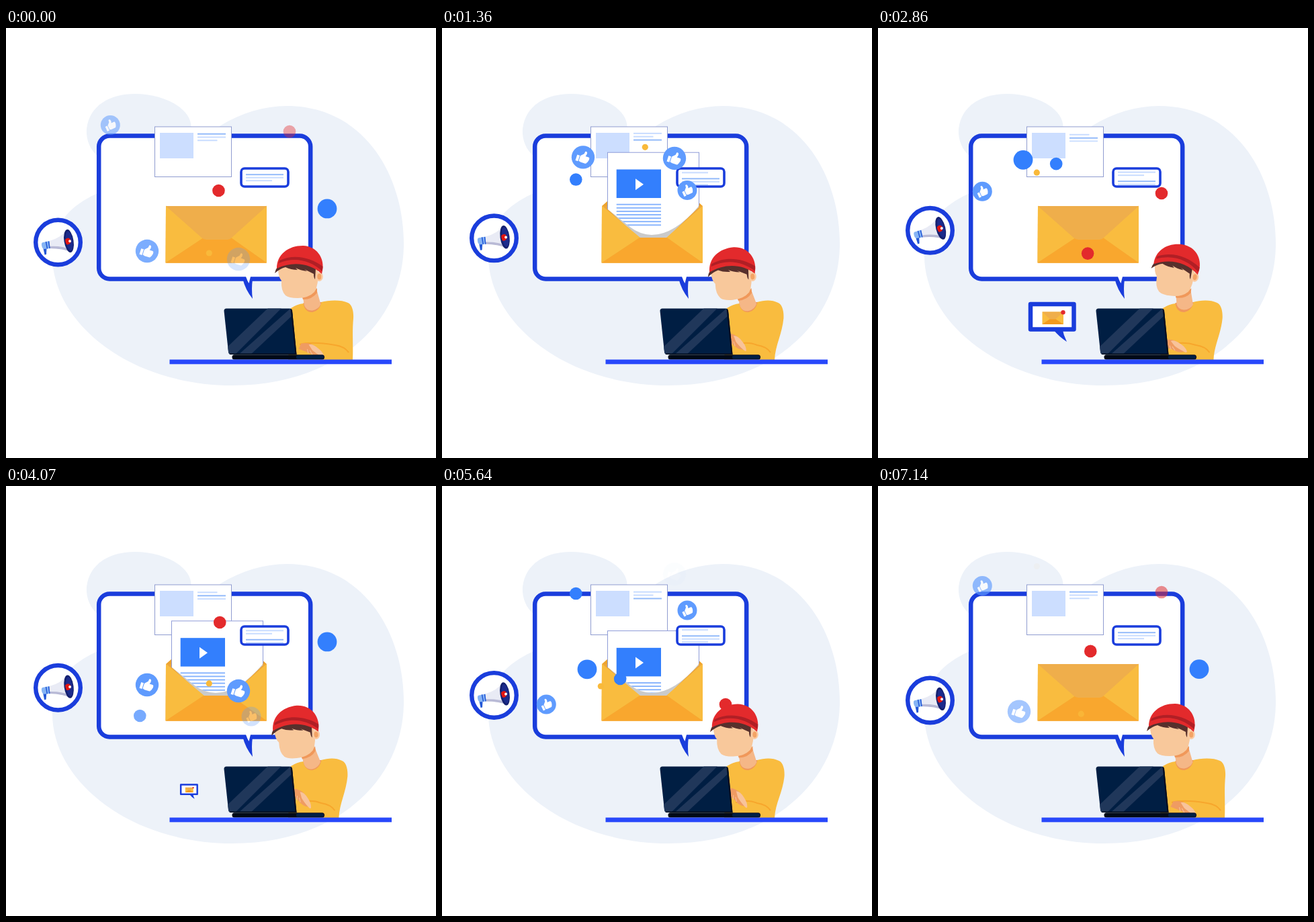
Recreate the animation shown at these times as an HTML page. Size 640 by 640 pixels, loop 7210 ms.

```html
<!DOCTYPE html>
<html lang="en">
<head>
<meta charset="utf-8">
<title>Email campaign</title>
<style>
  html, body { margin: 0; width: 100%; height: 100%; overflow: hidden; background: #fff; }
  svg { display: block; width: 100vw; height: 100vh; }
</style>
</head>
<body>
<svg viewBox="0 0 640 640">
  <defs>
    <clipPath id="cardClip"><rect x="284" y="155" width="46" height="14.6"/></clipPath>
    <clipPath id="badgeClip"><rect x="354" y="212.5" width="62" height="21.5"/></clipPath>
    <clipPath id="pocket"><path d="M236 150H392V258L383 264Q346 308 312 308Q294 307 281 297L247 270H236Z"/></clipPath>
    <clipPath id="lid"><path d="M324.5 421Q324.5 417.5 328 417.5H422Q425.500 417.500 426 421L432.500 486H335Q331.500 486 331 482Z"/></clipPath>
    <g id="thumb" fill="#fff">
      <path d="M-9.500-1H-5.500V8H-9.500Z"/>
      <path d="M-4.500-1L0-5.500L.5-9Q2-10.500 3.700-8.500Q4.600-6 3-2.500H8Q10-2 9.500 0Q10 1.500 9 3Q9 5 8 5.500Q7.800 8 5.500 8H-1.500L-4.500 7Z"/>
    </g>
  </defs>

  <g fill="#edf2f9">
    <path d="M318 146C350 126 385 116 418 116C530 116 593 215 592 325C590 440 490 532 337 532C185 532 70 440 69 340C70 290 95 265 136 246L318 250Z"/>
    <path d="M136 190C124 180 119 165 120 150C124 115 155 98 192 98C235 98 278 120 275.500 150L240 200Z"/>
  </g>

  <!-- speech screen -->
  <rect x="138.200" y="160.500" width="315" height="213" rx="16" fill="#fff" stroke="#1a3ddc" stroke-width="6.500"/>
  <path d="M352.500 374Q356 389 367 403Q365 388 367 374Z" fill="#1a3ddc"/>
  <path d="M357 370Q359 376 361.500 380Q363 374 364 370Z" fill="#fff"/>

  <!-- card behind the letter -->
  <rect x="221.500" y="147" width="114" height="74.500" fill="#fff" stroke="#8f9cd0"/>
  <rect x="229" y="156" width="50" height="38" fill="#ccdeff"/>
  <g id="cardLines" clip-path="url(#cardClip)"></g>

  <!-- envelope -->
  <path id="flapBack" fill="#eda32e"/>
  <path d="M238 265H388V349.500H237.500Z" fill="#eda63a"/>
  <path d="M247 270L266 266H364L383 266L334 313H294Z" fill="#cacaca"/>
  <g clip-path="url(#pocket)"><g id="letter">
    <rect x="246.500" y="0" width="136" height="140" fill="#fff" stroke="#8f9cd8"/>
    <rect x="259.700" y="25.300" width="66.300" height="42.500" fill="#337ffd"/>
    <path d="M288 39V56L300 47.500Z" fill="#fff"/>
    <g id="letterLines" fill="#86b3fd"></g>
  </g></g>
  <path d="M238 264.500L295 312L237.500 349.500ZM388 264.500L334 312L388 349.500Z" fill="#f9bc3f"/>
  <path d="M237.500 349.700L294 312H335L388 349.700Z" fill="#f9a72e"/>
  <path id="flapFront" fill="#efae4b"/>

  <!-- badge -->
  <rect x="350" y="209" width="70" height="27" rx="5" fill="#fff" stroke="#1a3ddc" stroke-width="3.600"/>
  <g id="badgeLines" clip-path="url(#badgeClip)"></g>

  <!-- megaphone -->
  <g id="ring">
    <circle r="33.300" fill="#fff" stroke="#1a3ddc" stroke-width="6.400"/>
    <g id="horn">
      <path d="M-22 9L-17 8L-17.500 18L-20 18.500Z" fill="#2257d6"/>
      <path d="M-13-2Q5-7 13-19L20 14Q8 9-13 9Z" fill="#e9ebf5"/>
      <path d="M-13 6Q6 5 20 11L21 15Q8 9-13 9Z" fill="#b9bad6"/>
      <path d="M-22 0Q-25 0-24.500 4Q-24 9-21 10L-12 9L-13-2Z" fill="#86b4f4"/>
      <path d="M-18-1L-16 9.500M-14-1.500L-12.500 9" stroke="#2257d6" stroke-width="1.500"/>
      <g transform="translate(16-2)rotate(-9)">
        <ellipse rx="7" ry="17.300" fill="#14206f"/>
        <ellipse cx=".8" rx="5" ry="14.500" fill="#1c2b8c"/>
        <path d="M-5-3Q1-7 3-1Q3 6-4 5Q-6 1-5-3Z" fill="#e3150f"/>
        <circle cx="1.500" cy=".5" r="2" fill="#fff"/>
      </g>
    </g>
  </g>

  <!-- small message -->
  <g id="popup">
    <path d="M261 449Q269 459 281 467Q276 457 274 446Z" fill="#1a3ddc"/>
    <rect x="227" y="411" width="64.500" height="37.500" fill="#fff" stroke="#1a3ddc" stroke-width="6.500" stroke-linejoin="round"/>
    <rect x="244.500" y="422.500" width="31.500" height="18.500" fill="#f9bc3f"/>
    <path d="M244.500 441L256 433H264L276 441Z" fill="#f39a1e"/>
    <path d="M244.500 422.500H276L264 433.500H256Z" fill="#efae4b"/>
    <circle cx="275.500" cy="423.200" r="3.200" fill="#e32a2c"/>
  </g>

  <g id="bubbles"></g>

  <!-- person -->
  <path id="body" fill="#f9bc3f"/>
  <path id="sleeve" fill="none" stroke="#f7a62c" stroke-width="2"/>
  <path d="M442.500 409Q444 423 456 423Q467 421 469.500 408Z" fill="#f0975a"/>
  <g id="head">
    <path d="M441 396L444 413Q447 421 456 420.500Q465 419 468.500 411L461 385Z" fill="#f5b787"/>
    <path d="M441 401Q455 400 463 387L463 394Q456 404 442 404Z" fill="#f0985a"/>
    <path d="M405 358Q405 370 410 376Q409 391 416 398Q421 402 434 402Q450 402 459 393Q466 382 464 360L430 345Z" fill="#f8c89b"/>
    <ellipse cx="466" cy="370" rx="5.800" ry="7" fill="#fbcba2"/>
    <ellipse cx="466.300" cy="370" rx="3" ry="4.500" fill="#f3a365"/>
    <path d="M400 365Q402 354 413 349L440 348L461 358L460 374Q458 372 458 366Q450 362 444 359Q447 361 448 362Q438 361 431 357Q433 359 434 360Q424 360 416 356Q408 358 400 365Z" fill="#57302c"/>
    <path d="M403 358C403 337 420 324 442 324C463 325 473 342 471.500 358L470 366C452 349 425 347 403 358Z" fill="#e32a2c"/>
    <path d="M407 346C428 336 453 341 471.500 355L470.500 362C453 346 430 340 406 350Z" fill="#b01f25"/>
  </g>
  <g id="hand">
    <path d="M-25 0Q-14-7-6-5L10 5Q4 10-8 8L-25 9Z" fill="#ef9b62"/>
    <path d="M-14-3Q-9-7 1-4Q10-2 14 3Q15 6 10 5Q0 4-6 2Z" fill="#f8c39a"/>
    <path d="M-9 4L-3 8M-13 4L-9 9" stroke="#f8c39a"/>
  </g>

  <!-- laptop and desk -->
  <g clip-path="url(#lid)">
    <path d="M320 415H436V490H320Z" fill="#001e43"/>
    <path d="M392 415H412L340 487H325V479ZM425 416L427 427L362 488H344Z" fill="#20375a"/>
    <path d="M425 417L432 486H333" fill="none" stroke="#000c1c" stroke-width="3"/>
  </g>
  <rect x="336.500" y="486.300" width="137.500" height="7.200" rx="3.500" fill="#000a18"/>
  <rect x="432" y="487" width="41" height="5.600" rx="2.600" fill="#001e43"/>
  <rect x="243.500" y="493.500" width="330.500" height="6.800" fill="#2848fb"/>
</svg>
<script>
const STEP = 1000 / 14, LOOP = 7210, SPAN = 100.5, LIFE = 27.5;
const $ = id => document.getElementById(id);
const set = (el, name, value) => el.setAttribute(name, value);
const mod = (a, n) => ((a % n) + n) % n;

function make(parent, tag, attrs) {
  const el = document.createElementNS('http://www.w3.org/2000/svg', tag);
  for (const name in attrs) set(el, name, attrs[name]);
  return parent.appendChild(el);
}

// Monotone cubic through [x, y] keys
function track(...keys) {
  const slope = i => (keys[i + 1][1] - keys[i][1]) / (keys[i + 1][0] - keys[i][0]);
  const tangent = i => {
    if (i < 1 || i > keys.length - 2) return 0;
    const a = slope(i - 1), b = slope(i);
    return a * b > 0 ? 2 * a * b / (a + b) : 0;
  };
  return x => {
    if (x <= keys[0][0]) return keys[0][1];
    for (let i = 0; i < keys.length - 1; i++) {
      const [x0, y0] = keys[i], [x1, y1] = keys[i + 1];
      if (x > x1) continue;
      const w = x1 - x0, u = (x - x0) / w, v = 1 - u;
      return v * v * (1 + 2 * u) * y0 + u * u * (3 - 2 * u) * y1
        + w * u * v * (v * tangent(i) - u * tangent(i + 1));
    }
    return keys[keys.length - 1][1];
  };
}

// Tracks over one half of the loop
const headTurn = track([0, 0], [5, -5.5], [10, -7], [19, -5], [28, -1.5], [40, 7], [50, 0]);
const shoulder = track([0, 517], [5.5, 508.5], [10, 508], [28, 509.5], [40, 513], [46, 518.5], [50, 517]);
const elbow = track([0, 516], [5.5, 495.5], [10, 495], [28, 495], [40, 500], [46, 516], [50, 516]);
const handX = track([0, 462], [6, 446], [10, 442], [28, 446], [40, 448], [50, 462]);
const handY = track([0, 480], [6, 467], [10, 477], [20, 468], [28, 466], [40, 474], [50, 480]);
const handTurn = track([0, 10], [6, 28], [10, -4], [20, 24], [28, 28], [40, 5], [50, 10]);
const hornTurn = track([0, 0], [10, 2], [28, 0], [40, -5], [50, 0]);
const scroll = track([0, 0], [6.1, .57], [10, .86], [28, .97], [28.6, 1], [40, .58], [50, 0]);
const letterTop = track([1, 285], [6.1, 201], [10, 187.5], [15, 184], [22, 188], [28, 207.5], [28.6, 216], [33, 285]);
const flap = track([0, 1], [2, -1], [32.5, -1], [35.5, 1]);
// Track over the whole loop
const popScale = track([22, 0], [28, .38], [36, 1], [49, 1], [57, .38], [62, 0]);

const BLUE = '#337ffd', RED = '#e32a2c', GOLD = '#f9b93a';
// x, start y, speed, radius, colour or tilt, two birth times, drift
const bubbles = [
  [478, 350, 7.4, 14.4, BLUE, -10.95, 41.05],
  [216, 350, 7.8, 14.4, BLUE, 20.3, 69.1],
  [199.3, 353, 8.27, 9.3, BLUE, 3.59, 55.67],
  [265.2, 350, 8.57, 9.3, BLUE, 22.75, 71.65],
  [302.3, 352, 8.3, 4.6, GOLD, -2.05, 50],
  [236.3, 352, 8.5, 4.6, GOLD, 23.9, 72.65],
  [311, 360, 7.8, 9.3, RED, -15.13, 36.87, .36],
  [422, 360, 7.95, 9.3, RED, 25.66, 74.6],
  [210, 344, 7.35, 17.2, 18, -1.63, 50.47],
  [346, 348, 7.9, 17.2, 18, -.5, 51.56],
  [365, 347, 7.18, 14.5, -25, 4.29, 56.44],
  [155.3, 357.5, 8.4, 14.5, -25, 26.4, 75.13]
].map(([x, y, v, r, look, b1, b2, drift = 0]) => {
  const el = make($('bubbles'), 'g', {});
  const tilted = typeof look === 'number';
  make(el, 'circle', { r, fill: tilted ? '#5f9bfe' : look });
  if (tilted) make(el, 'use', { href: '#thumb', transform: `rotate(${look}) scale(${r / 17.2})` });
  return { el, x, y, v, b1, b2, drift };
});

for (let i = 0; i < 7; i++)
  make($('letterLines'), 'rect', { x: 259.7, y: 76.5 + 5.1 * i, width: 66.3, height: 1.9 });

// Dark, light and short light line; copies make the scroll wrap
function lineSet(parent, x, wide, short, gap, copies, period) {
  const inner = make(parent, 'g', {});
  for (const c of copies)
    [wide, wide, short].forEach((width, i) => make(inner, 'rect', {
      x, y: c * period + gap * i - 1, width, height: 2, fill: i ? '#c8dcff' : '#94bbfa'
    }));
  return inner;
}
const cardInner = lineSet($('cardLines'), 285, 42, 29.5, 4.8, [-1, 0], 14.6);
const badgeInner = lineSet($('badgeLines'), 357, 56, 39, 4.5, [0, 1], 18);

function flapPath(s) {
  const y = 265 + 50 * s, c = y - 3 * s;
  return `M238 265L291 ${c}Q294 ${y} 298 ${y}H330Q333 ${y} 336 ${c}L388 265Z`;
}

function draw(k) {
  const p = k < 51 ? k * 50 / 51 : (k - 51) * 50 / 49;

  const s = flap(p);
  set($('flapBack'), 'd', s < 0 ? flapPath(s) : '');
  set($('flapFront'), 'd', s >= 0 ? flapPath(s) : '');
  set($('letter'), 'transform', `translate(0 ${letterTop(p)})`);
  set(cardInner, 'transform', `translate(0 ${157.7 + 9.8 * scroll(p)})`);
  set(badgeInner, 'transform', `translate(0 ${218.2 - 13 * scroll(p)})`);

  const ringY = 309.2 + 9.8 * Math.cos(2 * Math.PI * k / SPAN);
  set($('ring'), 'transform', `translate(77.500 ${ringY})`);
  set($('horn'), 'transform', `rotate(${hornTurn(p)})`);
  set($('popup'), 'transform', `translate(280.500 465) scale(${popScale(k)}) translate(-280.500 -465)`);

  for (const b of bubbles) {
    const age = Math.min(mod(k - b.b1, SPAN), mod(k - b.b2, SPAN));
    const alpha = Math.max(0, Math.min(1, age / 2, (LIFE - age) / 4));
    set(b.el, 'opacity', alpha);
    set(b.el, 'transform', `translate(${b.x + b.drift * age} ${b.y - b.v * age})`);
  }

  const e = shoulder(p), w = elbow(p);
  set($('body'), 'd', `M420 494L424 417Q433 411 443 410L469 408C480 405 ${e - 18} 404 ${e - 8} 409`
    + `C${e - 1} 412 ${e + .5} 424 ${e} 432C${e - 2} 455 ${w + 1} 472 ${w} 494Z`);
  set($('sleeve'), 'd', `M437 471Q455 466 ${w - 26} 472M${w - 26} 472Q${w - 12} 474 ${w - 6} 483`);
  set($('head'), 'transform', `rotate(${headTurn(p)} 463 415)`);
  set($('hand'), 'transform', `translate(${handX(p)} ${handY(p)}) rotate(${handTurn(p) + 15})`);
}

const start = performance.now();
function tick() {
  const t = (performance.now() - start) % LOOP;
  draw(Math.min(100, Math.floor((t + 5) / STEP)));
  requestAnimationFrame(tick);
}
tick();
</script>
</body>
</html>
```
